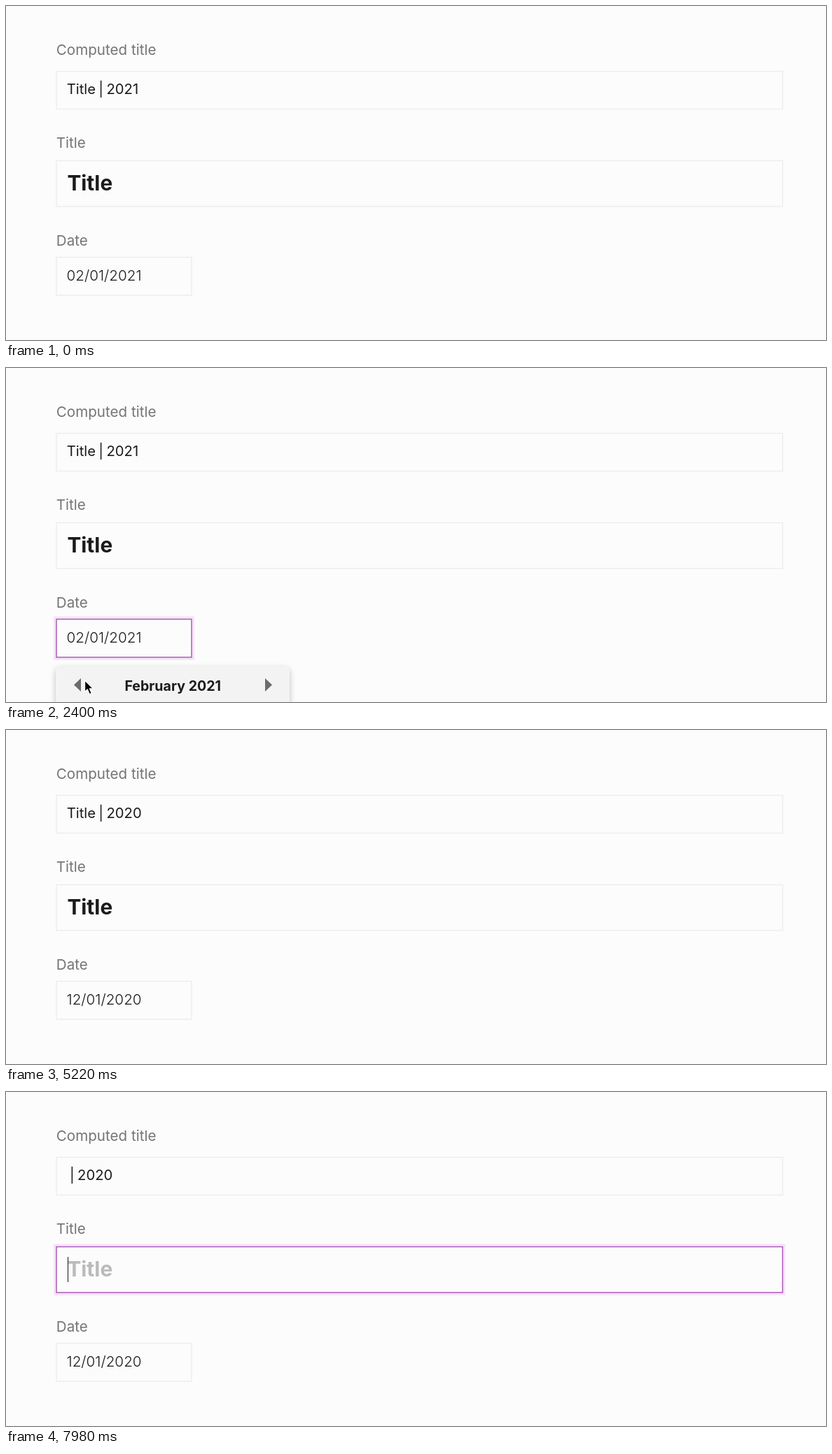
An HTML page that plays this animation: 1171 px wide and 478 px high, repeating every 8000 ms.

```html
<!DOCTYPE html>
<html lang="en">
<head>
<meta charset="utf-8">
<title>Computed title field</title>
<style>
  html, body { margin: 0; width: 100%; height: 100%; overflow: hidden; background: #fcfcfc; }
  svg { display: block; width: 1171px; height: 478px; }
  text { font: 20.3px Inter, "Open Sans", sans-serif; fill: #1b1b1b; white-space: pre; }
  .label { font-size: 20.6px; fill: #757575; }
  .big { font-size: 29.8px; font-weight: 700; }
  .month { font-size: 19.6px; font-weight: 700; text-anchor: middle; }
  #computed { word-spacing: -1.4px; }
  #date { font-size: 20.7px; font-weight: 300; }
  .field { fill: none; stroke: #ececec; stroke-width: 1.3; }
  .ring { fill: none; stroke: #f5e4f7; stroke-width: 4; }
  .edge { fill: none; stroke: #a854b5; stroke-width: 1.4; }
  .caret { stroke: #333; stroke-width: 1.2; }
  #popup rect { fill: #f3f3f3; filter: drop-shadow(0 3px 4px rgba(0, 0, 0, .25)); }
  #popup path { fill: #6c6c6c; }
</style>
</head>
<body>
<svg viewBox="0 0 1171 478">
  <defs>
    <path id="beamLine" d="M-4 -10Q0 -10 0 -7Q0 -10 4 -10M0 -7V7M-4 10Q0 10 0 7Q0 10 4 10M-2.5 4H2.5"/>
  </defs>
  <rect width="1171" height="478" fill="#fcfcfc"/>
  <text class="label" x="71.8" y="69.8">Computed title</text>
  <text class="label" x="71.8" y="203.2">Title</text>
  <text class="label" x="71.8" y="343.2">Date</text>

  <rect class="field" x="72" y="93.5" width="1037" height="54"/>
  <rect class="field" x="72" y="221.5" width="1037" height="65.5"/>
  <rect class="field" x="72" y="359.5" width="193" height="54.5"/>

  <g id="titleFocus">
    <rect class="ring" x="70" y="219.5" width="1041" height="69.5"/>
    <rect class="edge" x="72" y="221.5" width="1037" height="65.5"/>
  </g>
  <g id="dateFocus">
    <rect class="ring" x="70" y="357.5" width="197" height="58.5"/>
    <rect class="edge" x="72" y="359.5" width="193" height="54.5"/>
  </g>

  <text id="computed" x="86.7" y="126.4"></text>
  <text id="title" class="big" x="87.4" y="263.5"></text>
  <text id="date" x="86.5" y="393.2"></text>
  <path id="titleCaret" class="caret" d="M0 236V272"/>
  <path id="dateCaret" class="caret" d="M199.3 374.5V399"/>

  <g id="popup">
    <rect x="71" y="427.5" width="334" height="80" rx="6"/>
    <path id="prev" d="M107 444V463L97 453.5Z"/>
    <path d="M370 444V463L380 453.5Z"/>
    <text id="month" class="month" x="238.2" y="461.5"></text>
  </g>

  <g id="cursor" stroke-linejoin="round" stroke-linecap="round">
    <g id="beam" fill="none">
      <use href="#beamLine" stroke="#fff" stroke-width="3"/>
      <use href="#beamLine" stroke="#222" stroke-width="1.4"/>
    </g>
    <path id="arrow" fill="#000" stroke="#fff" stroke-width="1.3"
      d="M0 0V16.5L3.8 13L6.7 19.8L9.8 18.5L7 11.9H12Z"/>
    <g id="hand" stroke="#111" stroke-width="1.1">
      <path fill="#fff" d="M-2 1Q-2 -1 0 -1Q2 -1 2.2 1L3.2 7Q5.5 5.4 6.6 7.4Q9 6.2 9.8 8.4
        Q12.6 7.8 12.7 10.6V14Q12.4 17 10.8 19V21H2.2V19.5Q-.4 17 -2.4 14
        Q-6 10.4 -5.2 9Q-4 7.4 -1 10.4Z"/>
      <path fill="none" stroke-width=".8" d="M3.2 13V17.5M6 13V17.5M8.8 13V17.5"/>
    </g>
  </g>
</svg>
<script>
const LOOP = 8000;
const OPEN = 1780, PICK = 4920, FOCUS = 5940, TYPE = 6620;

// [time, x, y] of the pointer's hot spot
const PATH = [
  [400, 238, 481], [860, 222.5, 385], [1960, 222.5, 385], [2400, 112.5, 447],
  [2460, 112.5, 447], [2740, 103, 449], [3760, 103, 449], [4160, 188, 496],
  [5360, 198, 486], [5880, 184.5, 244.5]
];
// Each list holds [start time, text]
const TITLES = [[0, "Title"], [TYPE, "Titl"], [6920, "Tit"], [7200, "Ti"], [7460, "T"], [7860, ""]];
const COMPUTED = [
  [0, "Title | 2021"], [5040, "Title | 2020"], [6660, "Titl | 2020"], [7020, "Tit | 2020"],
  [7300, "Ti | 2020"], [7580, "T | 2020"], [7980, " | 2020"]
];
const DATES = [[0, "02/01/2021"], [PICK, "12/01/2020"]];
const MONTHS = [[0, "February 2021"], [3000, "January 2021"], [3700, "December 2020"]];

const el = id => document.getElementById(id);
const show = (id, on) => el(id).setAttribute("visibility", on ? "visible" : "hidden");
const clamp = v => Math.min(1, Math.max(0, v));
const ramp = (t, from, to) => clamp((t - from) / (to - from));
const at = (list, t) => list.findLast(([start]) => start <= t)[1];

function setText(id, text) {
  if (el(id).textContent !== text) el(id).textContent = text;
}

function pointer(t) {
  const next = PATH.findIndex(p => p[0] > t);
  if (next === 0) return PATH[0].slice(1);
  if (next < 0) return PATH.at(-1).slice(1);
  const [t0, x0, y0] = PATH[next - 1], [t1, x1, y1] = PATH[next];
  const p = ramp(t, t0, t1), k = p * p * (3 - 2 * p);
  return [x0 + (x1 - x0) * k, y0 + (y1 - y0) * k];
}

function drawPointer(t) {
  const [x, y] = pointer(t);
  const visible = t >= 400 && t < TYPE;
  const inDate = y > 359 && y < 414 && x < 265;
  const inTitle = y > 221 && y < 287;
  const onPrev = t > OPEN && t < PICK && x < 109 && y > 440 && y < 468;
  el("cursor").setAttribute("transform", `translate(${x} ${y})`);
  show("beam", visible && (inDate || inTitle));
  show("hand", visible && onPrev);
  show("arrow", visible && !inDate && !inTitle && !onPrev);
  el("prev").style.fill = onPrev ? "#111" : "";
}

function draw(t) {
  const title = at(TITLES, t);
  setText("computed", at(COMPUTED, t));
  setText("date", at(DATES, t));
  setText("month", at(MONTHS, t));
  setText("title", title || "Title");
  el("title").style.fill = title ? "" : "#bbb";

  const picking = t >= OPEN && t < PICK;
  const dateFocus = t < OPEN ? 0 : picking ? ramp(t, 1740, 1960) : 1 - ramp(t, PICK, 5200);
  el("dateFocus").children[0].style.opacity = Math.sqrt(dateFocus);
  el("dateFocus").children[1].style.opacity = dateFocus;
  el("titleFocus").style.opacity = ramp(t, FOCUS - 20, 6160);

  show("popup", picking);
  show("dateCaret", picking && Math.floor((t - 1560) / 500) % 2 === 0);
  show("titleCaret", t >= 6920 || (t >= FOCUS && t < 6440));
  const caretX = 88.5 + (title ? el("title").getComputedTextLength() : 0);
  el("titleCaret").setAttribute("transform", `translate(${caretX} 0)`);
  drawPointer(t);
}

function tick() {
  draw(performance.now() % LOOP);
  requestAnimationFrame(tick);
}
tick();
</script>
</body>
</html>
```
